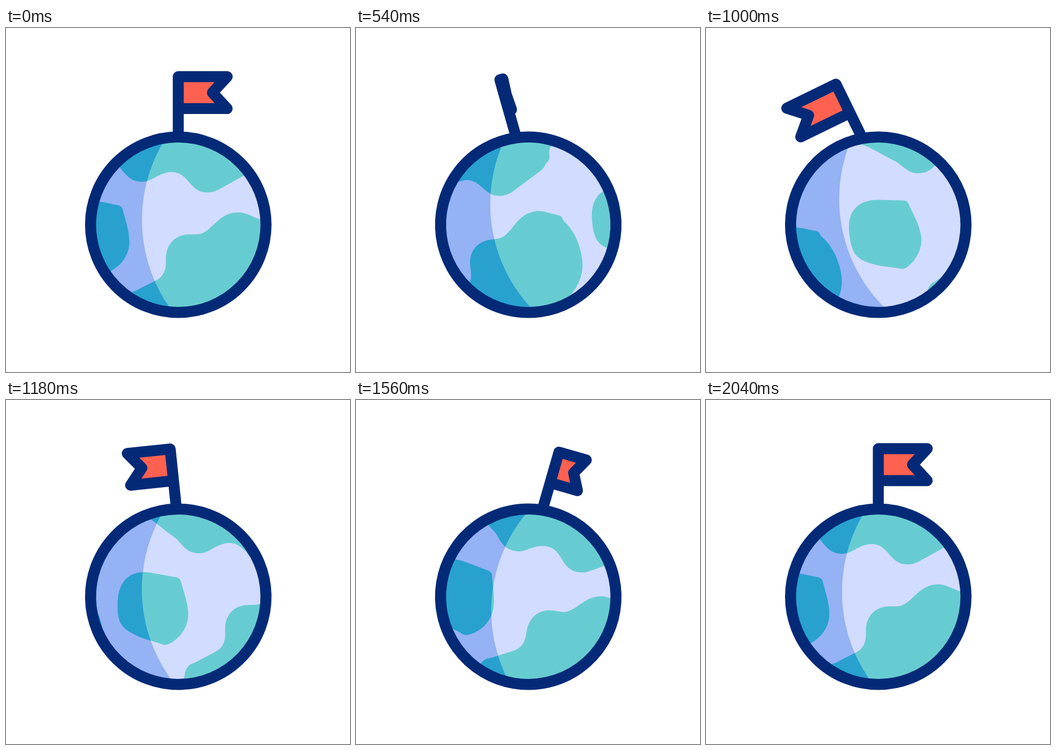
Animation, 640 px wide and 640 px high, one loop 2.06 s. Source, as an HTML page with a canvas:

```html
<!DOCTYPE html>
<html lang="en">
<head>
<meta charset="utf-8">
<title>Globe with flag</title>
<style>
  html, body { margin: 0; width: 100%; height: 100%; overflow: hidden; background: #fff; }
  canvas { display: block; width: 640px; height: 640px; }
</style>
</head>
<body>
<canvas id="stage" width="640" height="640"></canvas>
<script>
const ctx = document.getElementById('stage').getContext('2d');
const LOOP = 2060, PERIOD = 435, CX = 320.5, CY = 366, RIM = 163.2;
const NAVY = '#042a77', RED = '#ff6150';
const DAY = { sea: '#d2dcfe', land: '#67ccd1' };
const NIGHT = { sea: '#94b2f4', land: '#28a1cf' };

// Land in map coordinates, origin at the globe's centre; repeats every PERIOD.
const land = new Path2D(`
  M-185-160 C-160-150-142-133-132-125 L-109-107 C-95-90-88-80-66-80
  C-48-80-36-98-12-98 C20-98 20-60 54-60 C66-60 72-64 78-67 L132-97
  C140-102 139-106 147-112 C153-118 150-123 152-131 C154-142 170-150 194-151
  L200-160 V-220 H-185 Z
  M-104 160 L-100 147 C-99 138-96 132-91 128 C-86 124-80 124-76 121 L-42 104
  C-30 98-23 88-23 70 V66 C-24 35-4 18 20 18 L34 18 C62 18 72-23 111-23
  C126-23 135-16 152-10 L156-8 C160-6 159-1 161 2 C178 22 186 52 185 80
  C184 110 165 138 135 153 L120 165 V220 H-104 Z
  M324-36 L280-45 C240-54 214-34 213 12 C211 48 222 58 246 70
  C262 78 276 81 290 86 C298 90 302 90 309 86.5 C326 78 345 58 344 30
  C343 14 341 8 340 3 L332-27 C331-32 329-34 324-36 Z`);

// Smooth monotone curve through [time, value] knots, flat at turning points.
function track(...knots) {
  const rise = i => (knots[i + 1][1] - knots[i][1]) / (knots[i + 1][0] - knots[i][0]);
  const slope = knots.map((_, i) => {
    if (!i || i === knots.length - 1) return 0;
    const a = rise(i - 1), b = rise(i);
    return a * b <= 0 ? 0 : 2 * a * b / (a + b);
  });
  return t => {
    let i = 0;
    while (i < knots.length - 2 && t > knots[i + 1][0]) i++;
    const [t0, v0] = knots[i], [t1, v1] = knots[i + 1];
    const h = t1 - t0, u = Math.min(1, (t - t0) / h), w = 1 - u;
    return w * w * (1 + 2 * u) * v0 + u * u * (3 - 2 * u) * v1 +
           h * u * w * (w * slope[i] - u * slope[i + 1]);
  };
}

const scroll = track([0, 0], [340, 37], [720, 162], [1000, 269], [1380, 375], [1760, 425], [2060, PERIOD]);
const tilt = track([0, 0], [340, -3.8], [720, -10.7], [860, -11.3], [1000, -10.4],
  [1380, 9.2], [1450, 9.6], [1760, 7.2], [2050, 0]);
const lean = track([0, 0], [340, -7.5], [720, -22.6], [960, -26.5], [1000, -26],
  [1380, 15.8], [1450, 16.2], [1760, 15], [2050, 0]);
const spread = track([0, 1], [340, .555], [720, -.44], [1000, -1.12], [1060, -1.14],
  [1380, -.065], [1760, 1], [2060, 1]);

const rad = deg => deg * Math.PI / 180;

function drawMap(shift, { sea, land: fill }) {
  ctx.fillStyle = sea;
  ctx.fillRect(-200, -200, 400, 400);
  ctx.fillStyle = fill;
  for (const copy of [-PERIOD, 0, PERIOD]) {
    ctx.save();
    ctx.translate(copy - shift, 0);
    ctx.fill(land);
    ctx.restore();
  }
}

function drawGlobe(shift) {
  ctx.save();
  ctx.beginPath();
  ctx.arc(0, 0, RIM, 0, 7);
  ctx.clip();
  drawMap(shift, DAY);
  // Night side: everything outside a large circle.
  ctx.beginPath();
  ctx.rect(-600, -600, 1200, 1200);
  ctx.arc(216.5, -9, 284, 0, 2 * Math.PI);
  ctx.clip('evenodd');
  drawMap(shift, NIGHT);
  ctx.restore();
}

function drawFlag(angle, k) {
  ctx.save();
  ctx.translate(0, -RIM);
  ctx.rotate(angle);
  ctx.translate(0, -112.3);
  ctx.beginPath();
  ctx.moveTo(0, 0);
  for (const [x, y] of [[91, 0], [63.5, 29.7], [91, 59.4], [0, 59.4]]) ctx.lineTo(x * k, y);
  ctx.closePath();
  ctx.fillStyle = RED;
  ctx.fill();
  ctx.moveTo(0, 0);
  ctx.lineTo(0, 112);
  ctx.lineWidth = 20.4;
  ctx.stroke();
  ctx.restore();
}

function draw(t) {
  const turn = rad(tilt(t));
  ctx.fillStyle = '#fff';
  ctx.fillRect(0, 0, 640, 640);
  ctx.strokeStyle = NAVY;
  ctx.lineJoin = 'round';
  ctx.save();
  ctx.translate(CX, CY);
  ctx.rotate(turn);
  drawGlobe(scroll(t));
  drawFlag(rad(lean(t)) - turn, spread(t));
  ctx.beginPath();
  ctx.arc(0, 0, RIM, 0, 7);
  ctx.lineWidth = 20.6;
  ctx.stroke();
  ctx.restore();
}

const start = performance.now();
function tick() {
  draw((performance.now() - start) % LOOP);
  requestAnimationFrame(tick);
}
tick();
</script>
</body>
</html>
```
